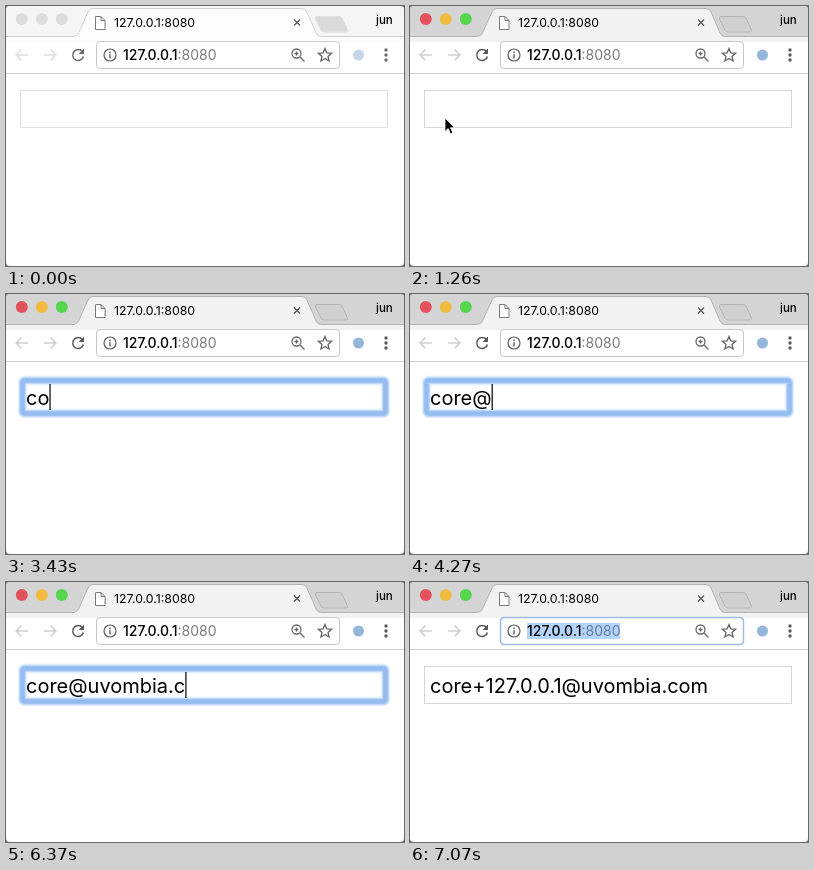
Recreate the animation shown at these times as an HTML page. Size 398 by 260 pixels, loop 9310 ms.

```html
<!DOCTYPE html>
<html lang="en">
<head>
<meta charset="utf-8">
<title>Browser form</title>
<style>
  html, body { margin: 0; width: 100%; height: 100%; overflow: hidden; background: #777; }
  svg { display: block; width: 398px; height: 260px; animation: window 9310ms step-end infinite; }
  text { font-family: Inter, Roboto, sans-serif; white-space: pre; }
  .field { font-size: 20px; }
  .strong { font-weight: 500; }

  .strip { fill: var(--strip); }
  .bar { fill: var(--bar); }
  .plus { fill: var(--plus); stroke: var(--rim); }
  .edge { stroke: var(--edge); }
  .icon { fill: none; stroke: var(--icon); stroke-width: 1.5; }
  .dim { fill: none; stroke: var(--dim); stroke-width: 1.5; }

  .ring, .select { visibility: hidden; animation: ring 9310ms step-end infinite; }
  .select { animation-name: select; }
  .port { fill: #7a7a7a; animation: port 9310ms step-end infinite; }
  .pointer { animation: move 9310ms infinite, show 9310ms step-end infinite; }

  @keyframes window {
    0% { --strip: #f5f5f5; --bar: #fdfdfd; --plus: #dadada; --rim: #dedede; --edge: #d2d2d2; --icon: #6c6c6c;
         --dim: #dedede; --red: #dcdcdc; --yellow: #dcdcdc; --green: #dcdcdc; --badge: #c6d5e8; --box: #dfdfdf; }
    12.782%, 100% { --strip: #d4d4d4; --bar: #f2f2f2; --plus: #d0d0d0; --rim: #b4b4b4; --edge: #b4b4b4; --icon: #5a5a5a;
         --dim: #cfcfcf; --red: #e2525d; --yellow: #efbb42; --green: #55d64d; --badge: #92b5db; --box: #d6d6d6; }
  }
  @keyframes ring {
    0% { visibility: hidden; }
    14.286% { visibility: visible; }
    73.684%, 100% { visibility: hidden; }
  }
  @keyframes select {
    0% { visibility: hidden; }
    73.684%, 100% { visibility: visible; }
  }
  @keyframes port {
    0% { fill: #7a7a7a; }
    73.684%, 100% { fill: #667c98; }
  }
  @keyframes show {
    0% { visibility: hidden; }
    0.752% { visibility: visible; }
    16.541%, 100% { visibility: hidden; }
  }
  @keyframes move {
    0%, 0.752% { transform: translate(160px, 240px); animation-timing-function: ease-in-out; }
    8.5% { transform: translate(31px, 116px); animation-timing-function: ease-out; }
    10.526%, 14.286% { transform: translate(35px, 112px); animation-timing-function: linear; }
    16.541%, 100% { transform: translate(35px, 117px); }
  }
</style>
</head>
<body>
<svg viewBox="0 0 398 260">
  <defs><clipPath id="frame"><rect width="398" height="260" rx="4"/></clipPath></defs>
  <g clip-path="url(#frame)">
    <rect width="398" height="260" fill="#fff"/>

    <!-- tab strip -->
    <rect class="strip" width="398" height="31"/>
    <path class="bar edge" d="M-1 30.500H67Q71 30.500 72.500 27L82 6Q83.500 2.500 87 2.500H296Q299.500 2.500 301 6L310 27Q311.500 30.500 315 30.500H399V34H-1Z"/>
    <rect class="bar" y="31" width="398" height="5"/>
    <path class="plus" d="M311 10.500H333Q335.500 10.500 336.500 13L341.500 24Q342 26 340 26H318Q316 26 315 24L309.500 13Q309 10.500 311 10.500Z"/>
    <circle cx="15.800" cy="13" r="6" fill="var(--red)"/>
    <circle cx="35.800" cy="13" r="6" fill="var(--yellow)"/>
    <circle cx="55.800" cy="13" r="6" fill="var(--green)"/>
    <path d="M89.500 10.500H95L99 14.500V23.500H89.500ZM95 10.500V14.500H99" fill="#fff" stroke="#7a7a7a"/>
    <text x="108" y="21" font-size="12.300">127.0.0.1:8080</text>
    <path d="M288 13.500L294 19.500M294 13.500L288 19.500" stroke="#555" stroke-width="1.200"/>
    <text class="strong" x="370" y="18" font-size="11.500">jun</text>

    <!-- toolbar -->
    <path d="M0 67.500H398" stroke="#d2d2d2"/>
    <path class="dim" d="M22 49H10.500M15.500 43.500L10 49L15.500 54.500M38 49H49.500M44.500 43.500L50 49L44.500 54.500"/>
    <path class="icon" d="M76.500 45.500A5.500 5.500 0 1 0 77.500 50.500"/>
    <path d="M78 42.500V48H72.500Z" fill="var(--icon)"/>
    <rect x="90.500" y="35.500" width="243" height="27" rx="3.500" fill="#fff" stroke="#c8c8c8"/>
    <g class="select">
      <rect x="90.500" y="35.500" width="243" height="27" rx="3.500" fill="none" stroke="#9dbbe4" stroke-width="1.500"/>
      <rect x="117" y="41" width="93" height="16" fill="#b3d4fc"/>
    </g>
    <circle cx="104" cy="49" r="6" fill="none" stroke="#5a5a5a" stroke-width="1.200"/>
    <path d="M104 45.500V47M104 48.200V52.500" stroke="#5a5a5a" stroke-width="1.400"/>
    <text x="117" y="54" font-size="14"><tspan class="strong">127.0.0.1</tspan><tspan class="port">:8080</tspan></text>
    <g fill="none" stroke="#666" stroke-width="1.300">
      <circle cx="290.500" cy="47.500" r="4.500"/>
      <path d="M294 51L298.500 55.500M288.500 47.500H292.500M290.500 45.500V49.500"/>
      <path d="M319 42.500L320.900 46.900L325.600 47.300L322 50.400L323.100 55L319 52.500L314.900 55L316 50.400L312.400 47.300L317.100 46.900Z"/>
    </g>
    <circle cx="352.500" cy="49" r="5.500" fill="var(--badge)"/>
    <g fill="var(--icon)">
      <circle cx="380" cy="44" r="1.700"/><circle cx="380" cy="49" r="1.700"/><circle cx="380" cy="54" r="1.700"/>
    </g>

    <!-- form field -->
    <rect x="14.500" y="84.500" width="367" height="37" fill="#fff" stroke="var(--box)"/>
    <g class="ring" fill="none">
      <rect x="16.500" y="86.500" width="363" height="33" rx="2" stroke="#e3eefc" stroke-width="9.500"/>
      <rect x="16.500" y="86.500" width="363" height="33" rx="2" stroke="#bfd8f8" stroke-width="7"/>
      <rect x="16.500" y="86.500" width="363" height="33" rx="2" stroke="#95bcf0" stroke-width="4.500"/>
    </g>
    <text id="value" class="field" x="20" y="111"></text>
    <rect id="caret" y="90" width="1.200" height="26"/>
    <path class="pointer" d="M0 0V13.500L3.200 10.500L5.500 15.800L7.800 14.800L5.500 9.700H9.700Z" stroke="#fff" stroke-width=".8"/>
  </g>
</svg>
<script>
  const LOOP = 9310, BLUR = 6860, FILL = 7000;
  const typed = "core@uvombia.com";
  const filled = "core+127.0.0.1@uvombia.com";
  const keys = [3150, 3430, 3570, 3780, 4130, 4620, 4830, 4970, 5180, 5390, 5600, 5810, 6160, 6370, 6510, 6580];
  const blinks = [[1330, 1820], [2380, 2870], [3150, BLUR]];
  const value = document.getElementById("value");
  const caret = document.getElementById("caret");

  function draw() {
    const t = performance.now() % LOOP;
    const count = keys.filter(k => k <= t).length;
    const text = t >= FILL ? filled : typed.slice(0, count);
    if (value.textContent !== text) value.textContent = text;
    const lit = blinks.some(([from, to]) => t >= from && t < to);
    caret.setAttribute("visibility", lit ? "visible" : "hidden");
    caret.setAttribute("x", 20 + (text ? value.getComputedTextLength() : 0));
    requestAnimationFrame(draw);
  }
  draw();
</script>
</body>
</html>
```
